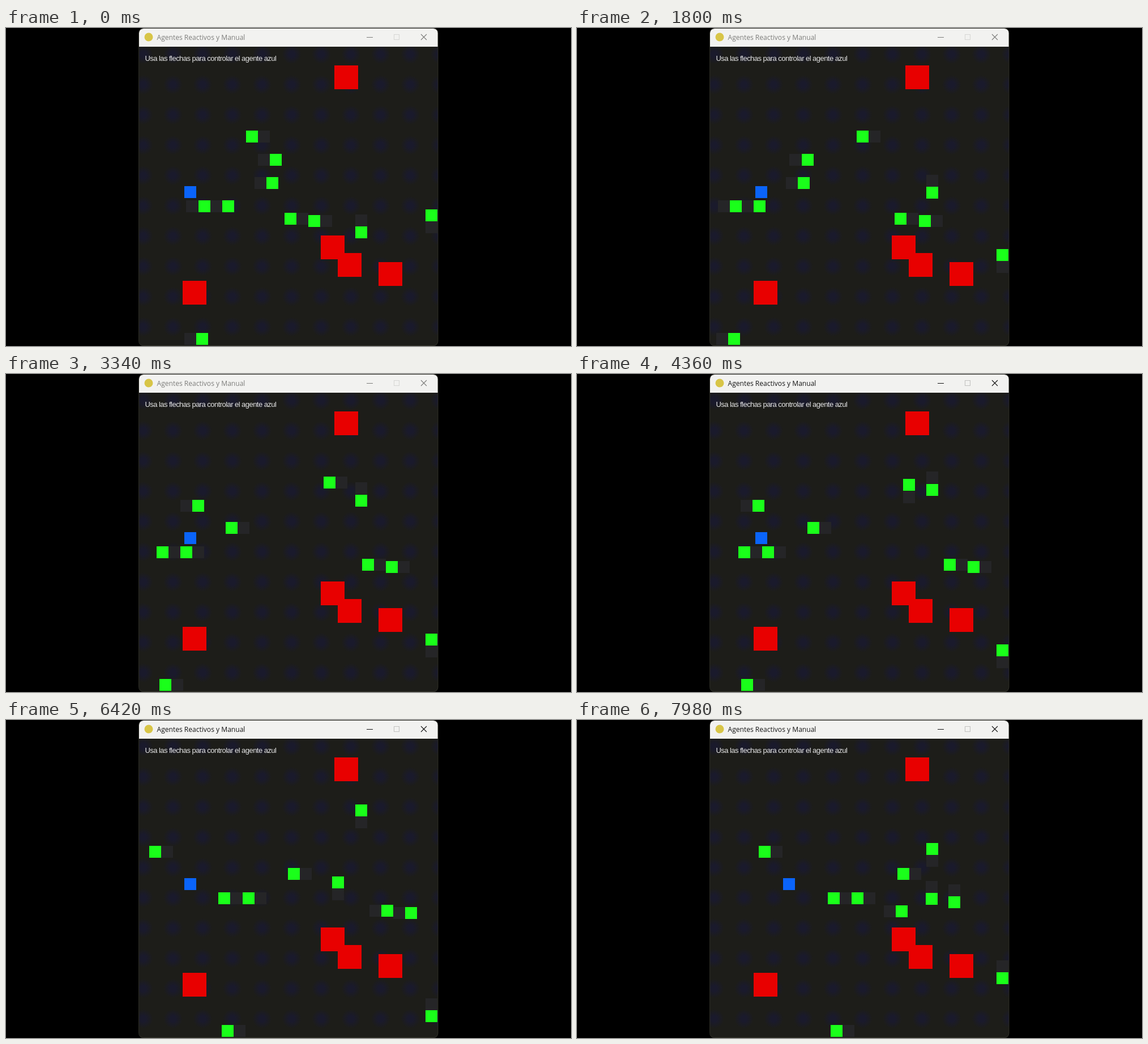
An HTML page for the animation above (8 s loop, 998 by 561 pixels).

```html
<!DOCTYPE html>
<html lang="es">
<head>
<meta charset="utf-8">
<title>Agentes Reactivos y Manual</title>
<style>
  html, body { margin: 0; width: 100%; height: 100%; overflow: hidden; background: #000; }
  svg { display: block; width: 998px; height: 561px; }
  .title { font: 12.07px "Open Sans", "Noto Sans", sans-serif; }
  .hint { font: 13px "Liberation Sans", Arial, sans-serif; letter-spacing: -0.55px; fill: #e6e6e6; }
  .bar { --ink: #7d7d7b; --faint: #d6d6d4; }
  .bar.active { --ink: #151515; --faint: #c2c2c0; }
  .bar text { fill: var(--ink); }
  .bar path { fill: none; stroke: var(--ink); stroke-width: 1.1; }
  .bar .max { stroke: var(--faint); }
  #world { shape-rendering: crispEdges; }
</style>
</head>
<body>
<svg viewBox="0 0 998 561" xmlns="http://www.w3.org/2000/svg">
  <defs>
    <radialGradient id="glow">
      <stop offset="0.3" stop-color="#1a1a2c"/>
      <stop offset="1" stop-color="#1a1a2c" stop-opacity="0"/>
    </radialGradient>
    <pattern id="floor" x="268.8" y="73.3" width="52.4" height="53.4" patternUnits="userSpaceOnUse">
      <rect width="53" height="54" fill="#1d1d19"/>
      <circle cx="26.2" cy="26.7" r="17" fill="url(#glow)"/>
    </pattern>
    <clipPath id="frame"><rect x="235" y="1" width="528" height="560" rx="8"/></clipPath>
  </defs>
  <rect width="998" height="561" fill="#000"/>
  <g clip-path="url(#frame)">
    <rect x="235" y="33" width="528" height="528" fill="url(#floor)"/>
    <g id="world"></g>
    <text class="hint" x="245.5" y="58">Usa las flechas para controlar el agente azul</text>
    <g class="bar" id="bar">
      <rect x="235" y="1" width="528" height="32" fill="#f2f2f0"/>
      <circle cx="252" cy="16" r="7.5" fill="#d8c547"/>
      <text class="title" x="266.5" y="20.7">Agentes Reactivos y Manual</text>
      <path d="M637 16.5h11"/>
      <path class="max" d="M685.5 11.5h9v9h-9z"/>
      <path d="M733 11l10 10M743 11l-10 10"/>
    </g>
  </g>
  <rect x="234.5" y="0.5" width="528.5" height="560" rx="8" fill="none" stroke="#38382f" stroke-width="0.8"/>
</svg>
<script>
const LOOP = 8000, SCALE = 1.056, CELL = 20, SPEED = 2, FIELD = 500;
const GREEN = '#1aff1a', BLUE = '#0a64fa', RED = '#e80000', SENSOR = '#252527';
const DIRS = { R: [1, 0], L: [-1, 0], U: [0, -1], D: [0, 1], W: [0, 0] };

// Start position, then runs of steps: right, left, up, down, wait.
const ROUTES = [
  '179 140.3 R72 D69 W2 L6',
  '219 179 L109 R40',
  '213 217.8 L49 U1 R99',
  '99 256.6 L50 R99',
  '139 256.6 L50 R99',
  '96 478 L48 R101',
  '243 277.4 R99 L40 U10',
  '283 281.4 R98 L1 R1 L40 U9',
  '361.7 300 U106 D43',
  '479.2 272 D104 U45'
];
const PLAYER = '76 233 W126 R23';
const WALLS = [[580, 66], [556, 366], [586, 397], [658, 412.5], [312, 446]];

// Screen refresh count against simulation steps; the flat part is the click on the title bar.
const CLICK = 72;
const PACE = [[0, 0], [25, 20], [52, 46], [CLICK, 66], [86, 66], [154, 134], [171, 149]];

const world = document.getElementById('world');
const bar = document.getElementById('bar');

function square(size, fill, x = 0, y = 0) {
  const el = document.createElementNS('http://www.w3.org/2000/svg', 'rect');
  for (const [key, value] of Object.entries({ x, y, width: size, height: size, fill })) {
    el.setAttribute(key, value);
  }
  return world.appendChild(el);
}

function place(el, x, y) {
  el.setAttribute('x', Math.round(235 + x * SCALE));
  el.setAttribute('y', Math.round(33 + y * SCALE));
}

function parse(route) {
  const [x, y, ...runs] = route.split(' ');
  return { x: +x, y: +y, runs: runs.map(r => [DIRS[r[0]], +r.slice(1)]) };
}

function locate({ x, y, runs }, steps) {
  let dir = runs[0][0];
  for (const [heading, length] of runs) {
    const n = Math.min(steps, length);
    if (n > 0) dir = heading;
    x += heading[0] * n * SPEED;
    y += heading[1] * n * SPEED;
    steps -= n;
  }
  return { x, y, dir };
}

// Refreshes last 20, 20 and 100 ms in turn.
function refreshAt(time) {
  const t = time + 20, rest = t % 140;
  return 3 * Math.floor(t / 140) + (rest < 20 ? 0 : rest < 40 ? 1 : 2) - 1;
}

function stepsAt(refresh) {
  const i = Math.max(1, PACE.findIndex(([n]) => n >= refresh));
  const [n0, s0] = PACE[i - 1], [n1, s1] = PACE[i];
  return Math.round(s0 + (s1 - s0) * (refresh - n0) / (n1 - n0));
}

const agents = ROUTES.map(parse);
agents.forEach(a => { a.sensor = square(21, SENSOR); });
WALLS.forEach(([x, y]) => square(42, RED, x, y));
agents.forEach(a => { a.body = square(21, GREEN); });
const player = parse(PLAYER);
player.body = square(21, BLUE);

const inside = v => v >= 0 && v <= FIELD - CELL;

function draw(time) {
  const refresh = refreshAt(time), steps = stepsAt(refresh);
  for (const agent of agents) {
    const { x, y, dir } = locate(agent, steps);
    const sx = x + dir[0] * CELL, sy = y + dir[1] * CELL;
    place(agent.body, x, y);
    place(agent.sensor, sx, sy);
    agent.sensor.setAttribute('visibility', inside(sx) && inside(sy) ? 'visible' : 'hidden');
  }
  const { x, y } = locate(player, steps);
  place(player.body, x, y);
  bar.classList.toggle('active', refresh >= CLICK);
}

const start = performance.now();
function tick() {
  draw((performance.now() - start) % LOOP);
  requestAnimationFrame(tick);
}
tick();
</script>
</body>
</html>
```
